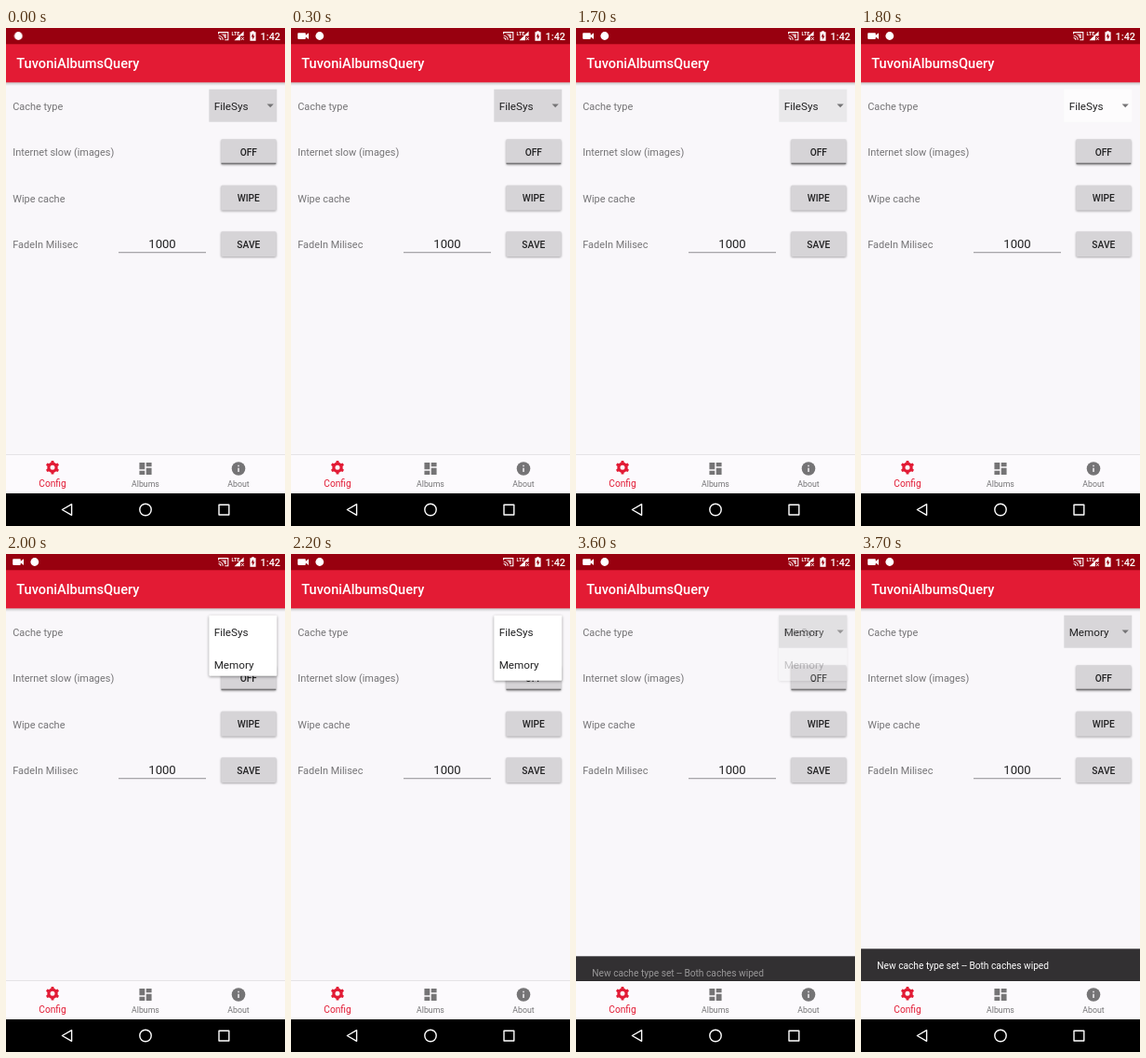
Write an HTML page that moves like this. It is 300x534 px and loops after 3.8 s.

```html
<!DOCTYPE html>
<html lang="en">
<head>
<meta charset="utf-8">
<title>Cache settings</title>
<style>
  html, body { margin: 0; width: 100%; height: 100%; overflow: hidden; background: #f9f7fa; }
  svg { display: block; width: 100vw; height: 100vh; font-family: Roboto, sans-serif; }

  .title { font-size: 14.6px; font-weight: 500; fill: #fff; }
  .clock { font-size: 10.9px; font-weight: 500; fill: #fff; }
  .label { font-size: 10.94px; fill: #757476; }
  .item  { font-size: 11.67px; fill: #212122; }
  .field { font-size: 13.1px; fill: #212122; text-anchor: middle; }
  .btn   { font-size: 10.2px; font-weight: 500; fill: #212122; text-anchor: middle; }
  .tab   { font-size: 8.75px; fill: #757476; text-anchor: middle; }
  .tab.on { font-size: 10.2px; fill: #e21b35; }
  .note  { font-size: 10.2px; fill: #fff; }
  .face  { fill: #d6d4d7; filter: drop-shadow(0 1px .8px #0005); }
  .card  { fill: #fff; filter: drop-shadow(0 1.2px 1.6px #0006); }

  /* 3800 ms loop, stepping every 100 ms (about 2.63%) */
  .cam, .droid, .spin, .was, .now, .pop, .card, .row2, .hl, .snack, .note {
    animation: 3.8s step-end infinite;
  }
  .cam   { animation-name: cam; transform-origin: 13px 8.5px; }
  .droid { animation-name: droid; }
  .spin  { animation-name: spin; }
  .was   { animation-name: was; }
  .now   { animation-name: now; }
  .pop   { animation-name: pop; }
  .card  { animation-name: card; }
  .row2  { animation-name: row2; }
  .hl    { animation-name: hl; }
  .snack { animation-name: snack; }
  .note  { animation-name: note; }

  @keyframes cam {
    0% { opacity: 0; transform: scale(.5); }
    5.26% { opacity: .6; transform: scale(.8); }
    7.89%, 100% { opacity: 1; transform: none; }
  }
  @keyframes droid {
    0% { transform: translateX(-17.5px); }
    5.26% { transform: translateX(-4px); }
    7.89%, 100% { transform: none; }
  }
  @keyframes spin {
    0% { fill: #d8d6d9; }
    42.1% { fill: #d3d1d4; }
    44.73% { fill: #e9e8ea; }
    47.36% { fill: #fdfcfd; }
    92.1%, 100% { fill: #d8d6d9; }
  }
  @keyframes was { 0% { opacity: 1; } 94.73%, 100% { opacity: 0; } }
  @keyframes now { 0% { opacity: 0; } 94.73%, 100% { opacity: 1; } }
  @keyframes pop {
    0% { opacity: 0; }
    50% { opacity: .85; }
    52.63% { opacity: 1; }
    92.1% { opacity: .94; }
    94.73% { opacity: .25; }
    97.36%, 100% { opacity: 0; }
  }
  @keyframes card {
    0% { height: 35px; }
    50% { height: 50px; }
    52.63% { height: 65px; }
    55.26%, 100% { height: 70px; }
  }
  @keyframes row2 { 0% { opacity: 0; } 52.63%, 100% { opacity: 1; } }
  @keyframes hl { 0% { opacity: 0; } 92.1%, 100% { opacity: 1; } }
  @keyframes snack {
    0% { transform: translateY(36px); }
    94.73% { transform: translateY(8px); }
    97.36%, 100% { transform: none; }
  }
  @keyframes note { 0% { opacity: 0; } 94.73% { opacity: .5; } 97.36%, 100% { opacity: 1; } }
</style>
</head>
<body>
<svg viewBox="0 0 300 534" preserveAspectRatio="none">
  <defs>
    <linearGradient id="shade" x2="0" y2="1">
      <stop stop-color="#000" stop-opacity=".22"/>
      <stop offset="1" stop-color="#000" stop-opacity="0"/>
    </linearGradient>
    <path id="tooth" d="M-1.7-5H1.7L1.3-7.3H-1.3Z"/>
  </defs>

  <rect width="300" height="534" fill="#f9f7fa"/>

  <!-- app bar -->
  <rect y="58" width="300" height="4" fill="url(#shade)"/>
  <rect y="17" width="300" height="41.3" fill="#e31b34"/>
  <text class="title" x="11.2" y="43.2">TuvoniAlbumsQuery</text>

  <!-- status bar -->
  <rect width="300" height="17.3" fill="#98000f"/>
  <g fill="#fff">
    <path class="cam" d="M8 5.3h7q.8 0 .8.8v1.6l3.2-2.4v6.6l-3.2-2.4v1.6q0 .8-.8.8h-7q-.8 0-.8-.8v-5q0-.8.8-.8z"/>
    <circle class="droid" cx="30.8" cy="8.5" r="4.4"/>
  </g>
  <g fill="none" stroke="#fff" stroke-width="1.1">
    <path d="M228.6 6.6V4.6h10.2v8.2h-3.5M228.6 8.2a4.6 4.6 0 0 1 4.6 4.6M228.6 10.5a2.3 2.3 0 0 1 2.3 2.3"/>
    <path d="M231 6.6h5.8v4.4h-1.6q-1-3.4-4.2-4.4z" fill="#fff" stroke="none" opacity=".75"/>
  </g>
  <text x="242.6" y="8.2" font-size="5.4" font-weight="700" fill="#fff">LTE</text>
  <path d="M245.5 13.3L255.6 3.6V8.6h-3.6v4.7z" fill="#fff"/>
  <path d="M253 10l2.8 3M255.8 10l-2.8 3" stroke="#fff" stroke-width=".9"/>
  <path d="M262.4 4.3h1.8V3.2h2.6v1.1h1.8v9.4h-6.2z" fill="#fff"/>
  <path d="M266 5.8l-2.4 3.8h1.5v2.8l2.4-3.8H266z" fill="#98000f"/>
  <text class="clock" x="273.6" y="12.8">1:42</text>

  <!-- settings -->
  <g class="label">
    <text x="7.2" y="87.5">Cache type</text>
    <text x="7.2" y="137">Internet slow (images)</text>
    <text x="7.2" y="186.5">Wipe cache</text>
    <text x="7.2" y="235.6">FadeIn Milisec</text>
  </g>

  <rect class="spin" x="218.3" y="65.7" width="73" height="35"/>
  <text class="item was" x="223.7" y="88">FileSys</text>
  <text class="item now" x="223.7" y="88">Memory</text>
  <path d="M280.6 81.6h7.2l-3.6 3.6z" fill="#757476"/>

  <g class="face">
    <rect x="231.3" y="119.3" width="59.2" height="26.6" rx="1.4"/>
    <rect x="231.3" y="168.8" width="59.2" height="26.8" rx="1.4"/>
    <rect x="231.3" y="218.2" width="59.2" height="26.8" rx="1.4"/>
  </g>
  <rect x="231.5" y="144.6" width="58.8" height="1.5" fill="#757476"/>
  <g class="btn">
    <text x="260.8" y="136.5">OFF</text>
    <text x="260.8" y="186.1">WIPE</text>
    <text x="260.8" y="235.5">SAVE</text>
  </g>

  <text class="field" x="168" y="235.6">1000</text>
  <rect x="121" y="240.3" width="94" height=".9" fill="#858386"/>

  <!-- snackbar -->
  <g class="snack">
    <rect y="423.3" width="300" height="36" fill="#323032"/>
    <text class="note" x="17.3" y="444.8">New cache type set -- Both caches wiped</text>
  </g>

  <!-- bottom tabs -->
  <rect y="457" width="300" height="1.2" fill="#000" opacity=".08"/>
  <rect y="458" width="300" height="41.2" fill="#fcfafd"/>
  <g transform="translate(50 471.3)" fill="#e21b35">
    <circle r="4.1" fill="none" stroke="#e21b35" stroke-width="3.2"/>
    <use href="#tooth"/>
    <use href="#tooth" transform="rotate(60)"/>
    <use href="#tooth" transform="rotate(120)"/>
    <use href="#tooth" transform="rotate(180)"/>
    <use href="#tooth" transform="rotate(240)"/>
    <use href="#tooth" transform="rotate(300)"/>
  </g>
  <path transform="translate(141.25 463.7) scale(.729)" fill="#757476"
    d="M3 13h8V3H3zM3 21h8v-6H3zM13 21h8V11h-8zM13 3v6h8V3z"/>
  <circle cx="250" cy="472.5" r="7.3" fill="#757476"/>
  <path d="M249.3 468.8h1.4v1.4h-1.4zM249.3 471.7h1.4v4.4h-1.4z" fill="#fcfafd"/>
  <text class="tab on" x="50" y="491.8">Config</text>
  <text class="tab" x="150" y="491.6">Albums</text>
  <text class="tab" x="250" y="491.6">About</text>

  <!-- system buttons -->
  <rect y="499" width="300" height="35" fill="#000"/>
  <g fill="none" stroke="#fff" stroke-width="1.4" stroke-linejoin="round">
    <path d="M60.4 516.5L70.6 510.7v11.6z"/>
    <circle cx="150" cy="516.5" r="6.2"/>
    <rect x="229" y="511.2" width="10.8" height="10.8"/>
  </g>

  <!-- dropdown -->
  <g class="pop">
    <rect class="card" x="218.3" y="65.7" width="73" height="70" rx="1"/>
    <rect class="hl" x="218.3" y="100.7" width="73" height="35" fill="#eeeeee"/>
    <text class="item" x="223.7" y="88">FileSys</text>
    <text class="item row2" x="223.7" y="122.8">Memory</text>
  </g>
</svg>
</body>
</html>
```
